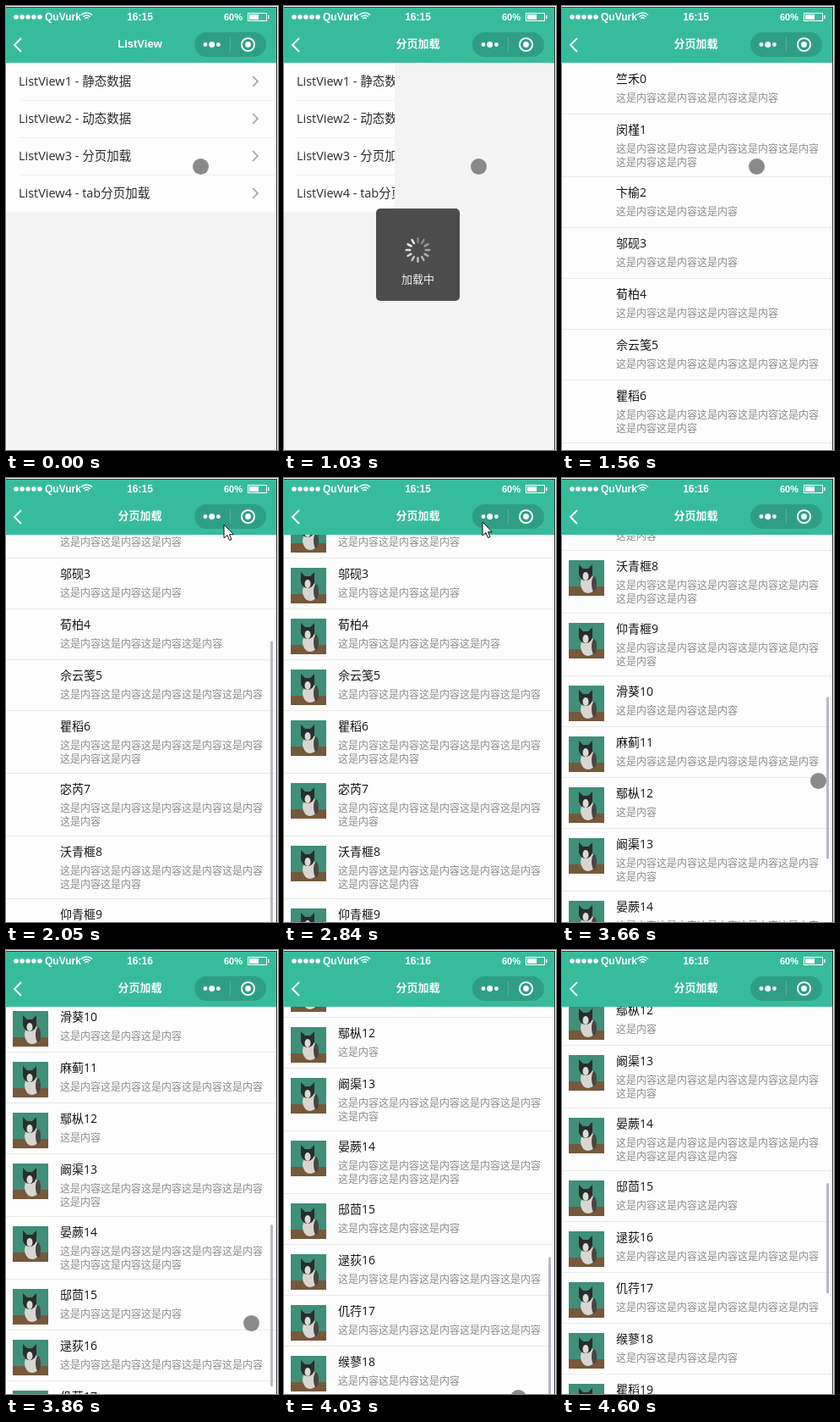
Recreate the animation shown at these times as an HTML page with a canvas. Size 322x524 px, loop 4.64 s.

```html
<!DOCTYPE html>
<html lang="zh">
<head>
<meta charset="utf-8">
<title>ListView</title>
<style>
html, body { margin: 0; width: 100%; height: 100%; overflow: hidden; background: #f3f3f3; }
canvas { display: block; width: 322px; height: 524px; }
</style>
</head>
<body>
<canvas id="stage" width="322" height="524"></canvas>
<script>
const ctx = document.getElementById('stage').getContext('2d');
const SANS = '"Open Sans", "Noto Sans CJK SC", "Noto Sans CJK", sans-serif';
const ARIAL = '"Liberation Sans", "Noto Sans CJK SC", "Noto Sans CJK", sans-serif';
const NAV = '#37bc9b', PAGE = '#f3f3f3', PAPER = '#fdfdfd', WHITE = '#fff';
const LOOP = 4640, TOP = 67, VIEW = 504;

// Moments of the story in ms
const TITLE = 490, PUSH = 880, LIST = 1540, DRAG = 1600, PHOTOS = 2440, FLING = 3123, MORE = 4600;
const DRAG_TIME = 400, FLING_TIME = 1036;

const menu = ['静态数据', '动态数据', '分页加载', 'tab分页加载'];

// Name and how often the phrase repeats in the item
const people = [
  ['竺禾', 4], ['闵槿', 7], ['卞榆', 3], ['邬砚', 3], ['荀柏', 4],
  ['佘云笺', 5], ['瞿稻', 7], ['宓芮', 6], ['沃青榧', 7], ['仰青榧', 6],
  ['滑葵', 3], ['麻蓟', 5], ['鄢枞', 1], ['阚渠', 6], ['晏蕨', 8],
  ['邸茴', 3], ['逯荻', 5], ['仉荇', 5], ['缑蓼', 3], ['瞿稻', 11]
];
let listHeight = 0;
const items = people.map(([name, count], i) => {
  const lines = Math.ceil(count / 5);
  const item = { label: name + i, count, lines, top: listHeight };
  listHeight += Math.max(60, 42 + 16 * lines);
  return item;
});

function ease(t, start, time) {
  const p = Math.min(1, Math.max(0, (t - start) / time));
  return p * p * (3 - 2 * p);
}

const scrollAt = t => 167 * ease(t, DRAG, DRAG_TIME) + 638 * ease(t, FLING, FLING_TIME);

function pointerAt(t) {
  const drag = ease(t, DRAG, DRAG_TIME), drift = ease(t, 2100, 700);
  const enter = ease(t, 2860, 260), pull = ease(t, FLING, 537), leave = ease(t, 3660, 420);
  return [
    230 + 28 * drag - 23 * drift + 55 * enter + 13 * pull - 27 * leave,
    189 - 134 * drag - 3 * drift + 378 * enter - 73 * pull + 178 * leave
  ];
}

function rect(x, y, w, h, color) {
  ctx.fillStyle = color;
  ctx.fillRect(x, y, w, h);
}

function pill(x, y, w, h, r, color) {
  ctx.fillStyle = color;
  ctx.beginPath();
  ctx.roundRect(x, y, w, h, r);
  ctx.fill();
}

function oval(x, y, rx, ry, color) {
  ctx.fillStyle = color;
  ctx.beginPath();
  ctx.ellipse(x, y, rx, ry, 0, 0, Math.PI * 2);
  ctx.fill();
}

const disc = (x, y, r, color) => oval(x, y, r, r, color);

function arc(x, y, r, from, to, color, width) {
  ctx.beginPath();
  ctx.arc(x, y, r, from, to);
  ctx.strokeStyle = color;
  ctx.lineWidth = width;
  ctx.stroke();
}

// dir is 1 for a right-pointing chevron, -1 for a left-pointing one.
function chevron(x, y, w, h, dir, color, width) {
  ctx.beginPath();
  ctx.moveTo(x - dir * w, y - h);
  ctx.lineTo(x, y);
  ctx.lineTo(x - dir * w, y + h);
  ctx.strokeStyle = color;
  ctx.lineWidth = width;
  ctx.stroke();
}

// y is the vertical centre of the line.
function text(str, x, y, size, color, family = SANS, weight = '', align = 'left') {
  ctx.font = `${weight} ${size}px ${family}`;
  ctx.textAlign = align;
  ctx.fillStyle = color;
  ctx.fillText(str, x, y + size * 0.36);
}

function drawMenu(t) {
  rect(0, TOP, 320, 176, PAPER);
  if (t >= 40 && t < 290) rect(0, 155, 320, 44, '#ececec');
  menu.forEach((label, i) => {
    const y = TOP + 22 + i * 44;
    text(`ListView${i + 1} - ${label}`, 15, y, 14.5, '#2c2c2c');
    chevron(298, y, 6, 6, 1, '#a0a0a0', 1.6);
    if (i) rect(15, y - 22, 305, 1, '#f1f1ec');
  });
}

const cat = new Path2D('M12 5l5 5h6l5-5v12q-2 7-8 7t-8-7z');

function drawPhoto(x, y) {
  ctx.save();
  ctx.translate(x, y);
  rect(0, 0, 42, 42, '#3f8f79');
  rect(0, 31, 42, 11, '#76583a');
  oval(23, 28, 9, 11, '#d9d6d2');
  oval(30, 28, 3, 9, '#474642');
  ctx.fillStyle = '#2b2c2c';
  ctx.fill(cat);
  oval(20, 19, 3.5, 5, '#dddad6');
  ctx.restore();
}

function drawThumb(t, scroll) {
  const moving = (t >= DRAG && t < 2400) || (t >= FLING && t < 4480) || t >= MORE;
  if (!moving) return;
  const total = t >= MORE ? 1950 : t >= PHOTOS ? listHeight : items[10].top;
  pill(313, TOP + scroll * VIEW / total, 3, VIEW * VIEW / total, 1.5, '#b7b7c6');
}

function drawList(t) {
  const scroll = Math.round(scrollAt(t)), loaded = t >= PHOTOS;
  rect(0, TOP, 320, 457, PAPER);
  items.slice(0, loaded ? 20 : 10).forEach(({ label, count, lines, top }) => {
    const y = TOP + top - scroll;
    if (top) rect(0, y, 320, 1, '#e9e9e4');
    if (loaded) drawPhoto(8, y + 12);
    text(label, 64, y + 19, 14, '#151515');
    for (let row = 0; row < lines; row++) {
      text('这是内容'.repeat(Math.min(5, count - row * 5)), 64, y + 42 + row * 16, 12, '#8c8c8c');
    }
  });
  drawThumb(t, scroll);
}

function drawToast(t) {
  pill(109, 239, 99, 109, 5, '#4c4c4c');
  const step = Math.floor(t * 12 / 1000);
  ctx.save();
  ctx.translate(158.5, 288);
  for (let i = 0; i < 12; i++) {
    const age = (step - i + 23) % 12;
    pill(-1.2, -15, 2.4, 7, 1.2, `rgba(245,245,245,${1 - age * 0.06})`);
    ctx.rotate(Math.PI / 6);
  }
  ctx.restore();
  text('加载中', 158.5, 322, 13, '#efefef', SANS, '', 'center');
}

function drawStatus(t) {
  for (let i = 0; i < 5; i++) disc(12 + i * 7, 13, 2.8, WHITE);
  text('QuVurk', 46, 13, 12, WHITE, ARIAL, 'bold');
  for (let r = 3; r <= 9; r += 3) arc(95.5, 17, r, -Math.PI * 0.75, -Math.PI * 0.25, WHITE, 1.5);
  text(t < 3560 ? '16:15' : '16:16', 158.5, 12.5, 12, WHITE, ARIAL, 'bold', 'center');
  text('60%', 258, 13, 11, WHITE, ARIAL, 'bold');
  ctx.strokeStyle = WHITE;
  ctx.lineWidth = 1;
  ctx.strokeRect(286.5, 8.5, 22, 9);
  rect(288, 10, 11, 6, WHITE);
  rect(310, 11, 1.5, 4, WHITE);
}

function drawNav(t) {
  rect(0, 0, 320, TOP, NAV);
  drawStatus(t);
  chevron(10, 46, 8, 8, -1, WHITE, 2);
  text(t < TITLE ? 'ListView' : '分页加载', 158.5, 44.5, 13, WHITE, ARIAL, 'bold', 'center');

  pill(223, 31, 85, 29, 14.5, '#2f9f83');
  rect(265, 37, 1, 17, '#55b39b');
  for (let i = -1; i <= 1; i++) disc(243.7 + i * 7.7, 45.5, i ? 2.4 : 3.5, WHITE);
  arc(286.5, 45.5, 7.6, 0, Math.PI * 2, WHITE, 2);
  disc(286.5, 45.5, 3.4, WHITE);
}

const arrow = new Path2D('M0 0v16l4-3.5 2.5 6 2.5-1-2.5-5.8h5z');

// A touch dot over the page, an arrow over the navigation bar
function drawPointer(x, y) {
  if (y >= TOP) {
    disc(x + 0.5, y + 0.5, 9.5, 'rgba(125,125,125,0.9)');
    return;
  }
  ctx.save();
  ctx.translate(x, y);
  ctx.fillStyle = WHITE;
  ctx.fill(arrow);
  ctx.strokeStyle = '#111';
  ctx.lineWidth = 1;
  ctx.stroke(arrow);
  ctx.restore();
}

function draw(t) {
  rect(0, 0, 322, 524, PAGE);
  if (t < LIST) {
    drawMenu(t);
    const edge = Math.round(320 * (1 - ease(t, PUSH, 269)));
    rect(edge, TOP, 320 - edge, 457, PAGE);
    if (t >= 860) drawToast(t);
  } else {
    drawList(t);
  }
  drawNav(t);
  drawPointer(...pointerAt(t).map(Math.round));
  rect(0, 1, 321, 1, '#2a3a36');
  rect(320, 1, 1, 523, '#2a2a2a');
  rect(0, 0, 322, 1, WHITE);
  rect(321, 0, 1, 524, WHITE);
}

const start = performance.now();
function tick() {
  draw((performance.now() - start) % LOOP);
  requestAnimationFrame(tick);
}
tick();
</script>
</body>
</html>
```
